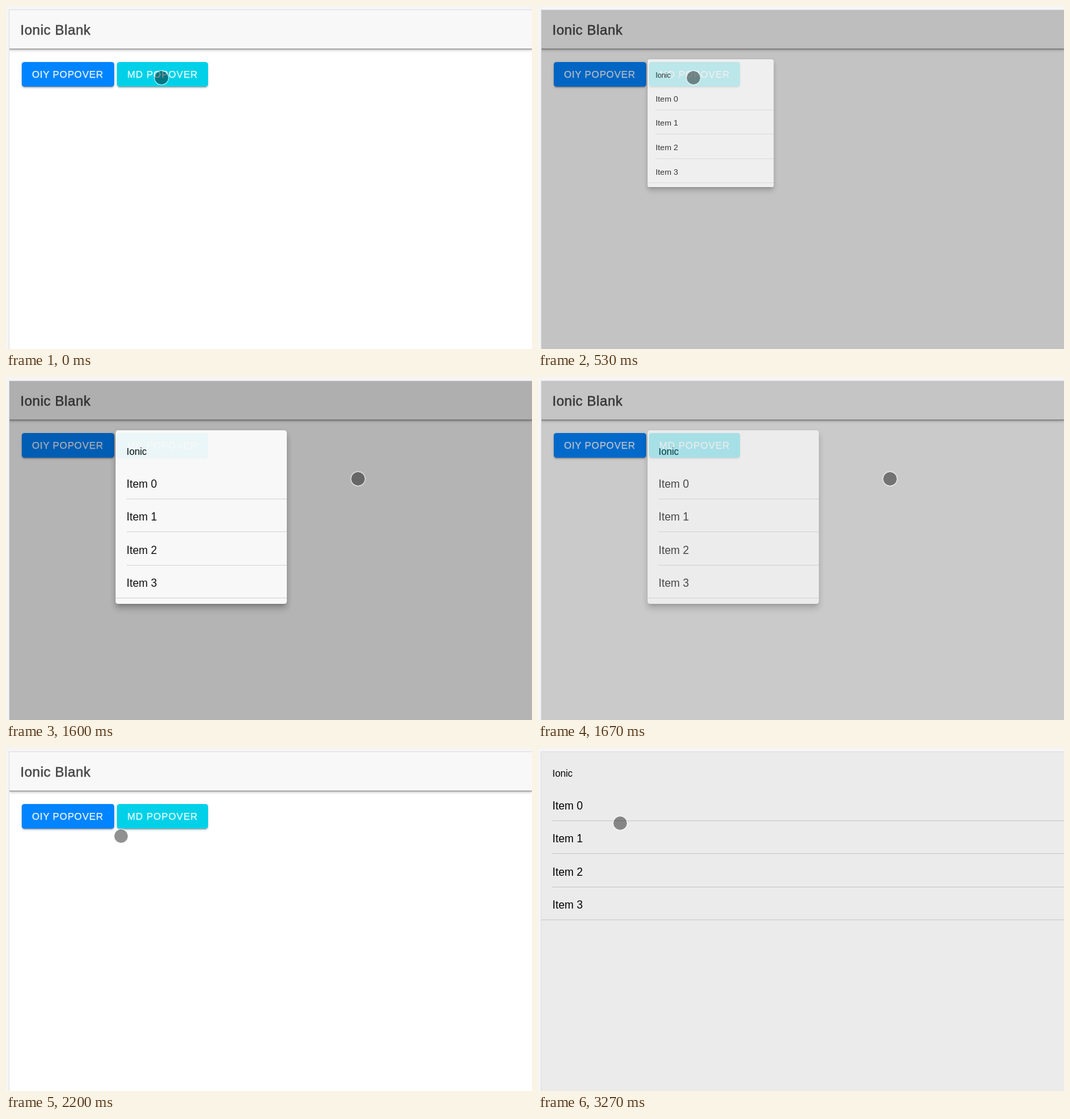
An HTML page that plays this animation: 768x502 px, repeating every 3.87 s.

```html
<!DOCTYPE html>
<html lang="en">
<head>
<meta charset="utf-8">
<title>Popover demo</title>
<style>
  html, body { margin: 0; width: 100%; height: 100%; overflow: hidden; }
  body { position: relative; background: #f5f5f5; font-family: "Liberation Sans", Arial, sans-serif; }
  div, span { position: absolute; box-sizing: border-box; white-space: nowrap; }
  .page, .backdrop, .sheet { left: 5px; top: 6px; width: 763px; height: 496px; }
  .page { background: #fff; box-shadow: 0 0 0 1px #e0e0e0; overflow: visible; }
  .header {
    width: 100%; height: 57px; background: #f8f8f8; border-bottom: 1px solid #b4b4b4;
    box-shadow: 0 1px 1px rgba(0,0,0,.2), 0 2px 4px rgba(0,0,0,.2);
    clip-path: inset(0 0 -10px 0);
  }
  .title {
    left: 16px; top: 17px; font-size: 20px; line-height: 24px; color: #424242;
    letter-spacing: .45px; -webkit-text-stroke: .4px #424242;
  }
  .button {
    top: 76px; height: 36px; border-radius: 4px; overflow: hidden; padding-left: 15px;
    font-size: 14px; line-height: 36px; letter-spacing: .06em;
    color: rgba(255,255,255,.92); -webkit-text-stroke: .25px rgba(255,255,255,.92);
    box-shadow: 0 3px 1px -2px rgba(0,0,0,.2), 0 2px 2px rgba(0,0,0,.14), 0 1px 5px rgba(0,0,0,.12);
  }
  .first { left: 18px; width: 135px; background: #0084ff; letter-spacing: .65px; }
  .second { left: 157px; width: 133px; background: #00d1e8; }
  .ripple { width: 220px; height: 220px; margin: -110px; border-radius: 50%; background: #fff; opacity: 0; }
  .first .ripple { left: 97px; top: 28px; }
  .second .ripple { left: 65px; top: 23px; }
  .backdrop { background: #000; opacity: 0; }
  .popover {
    left: 160px; top: 78px; width: 250px; height: 254px; background: #fff; border-radius: 4px;
    opacity: 0; transform-origin: 0 0;
    box-shadow: 0 5px 5px -3px rgba(0,0,0,.2), 0 8px 10px 1px rgba(0,0,0,.14), 0 3px 10px 1px rgba(0,0,0,.12);
  }
  .sheet { background: #ebebeb; box-shadow: 0 0 0 1px #dedede; opacity: 0; }
  .label { left: 16px; font-size: 16px; line-height: 20px; color: #000; }
  .label.head { font-size: 14px; top: 21px; }
  .rule { left: 16px; right: 0; height: 1px; background: rgba(0,0,0,.14); }
  .rule.last { left: 0; }
  .cursor {
    left: -11px; top: -11px; width: 22px; height: 22px; border-radius: 50%;
    border: 1.5px solid rgba(255,255,255,.65); background: rgba(0,0,0,.43); background-clip: padding-box;
  }
</style>
</head>
<body>
<div class="page">
  <div class="header"><span class="title">Ionic Blank</span></div>
  <div class="button first">OIY POPOVER<div class="ripple"></div></div>
  <div class="button second">MD POPOVER<div class="ripple"></div></div>
</div>
<div class="backdrop"></div>
<div class="popover list"></div>
<div class="sheet list"></div>
<div class="cursor"></div>
<script>
const LOOP = 3870;
const FRAME = 1000 / 15;
const find = selector => document.querySelector(selector);

for (const list of document.querySelectorAll('.list')) {
  let html = '<span class="label head">Ionic</span>';
  for (let i = 0; i < 4; i++) {
    const y = Math.round(i * 48.25);
    html += `<span class="label" style="top:${68.5 + y}px">Item ${i}</span>`;
    html += `<div class="rule${i === 3 ? ' last' : ''}" style="top:${100 + y}px"></div>`;
  }
  list.innerHTML = html;
}

// Each key is [ms, properties, easing towards the next key].
const tracks = [];
function track(selector, keys) {
  const [first, last] = [keys[0], keys[keys.length - 1]];
  const frames = [[0, first[1]], ...keys, [LOOP, last[1]]]
    .map(([ms, props, easing = 'linear']) => ({ offset: ms / LOOP, easing, ...props }));
  const animation = find(selector).animate(frames, { duration: LOOP, fill: 'both' });
  animation.pause();
  tracks.push(animation);
}

const fade = opacity => ({ opacity });
const grow = (opacity, scale) => ({ opacity, transform: `scale(${scale})` });
const at = (x, y) => ({ transform: `translate(${x}px, ${y}px)` });

track('.backdrop', [
  [313, fade(0), 'ease'], [813, fade(.32)],
  [1555, fade(.32), 'ease'], [2055, fade(0)]
]);
track('.popover', [
  [313, grow(0, 0), 'ease'], [813, grow(1, 1)],
  [1555, grow(1, 1), 'ease'], [2055, grow(0, 1)]
]);
track('.sheet', [[3110, fade(0)], [3250, fade(1)]]);
track('.second .ripple', [[30, grow(0, .4)], [70, grow(.1, .9)], [130, grow(0, 1)]]);
track('.first .ripple', [
  [2570, grow(0, .1), 'ease-out'], [2680, grow(.16, .5)],
  [2850, grow(.16, 1)], [3070, grow(0, 1)]
]);
track('.cursor', [
  [940, at(227, 105), 'ease-in-out'], [1467, at(514, 149)],
  [1770, at(514, 149), 'ease-in'], [1900, at(390, 139)],
  [2000, at(275, 132)], [2067, at(225, 132)], [2133, at(190, 131)],
  [2200, at(168, 129), 'ease-out'], [2533, at(120, 110)]
]);

const start = performance.now();
function draw() {
  const time = (performance.now() - start) % LOOP;
  const held = Math.floor((time + 4) / FRAME) * FRAME;
  for (const animation of tracks) animation.currentTime = Math.min(held, LOOP - 1);
  requestAnimationFrame(draw);
}
draw();
</script>
</body>
</html>
```
